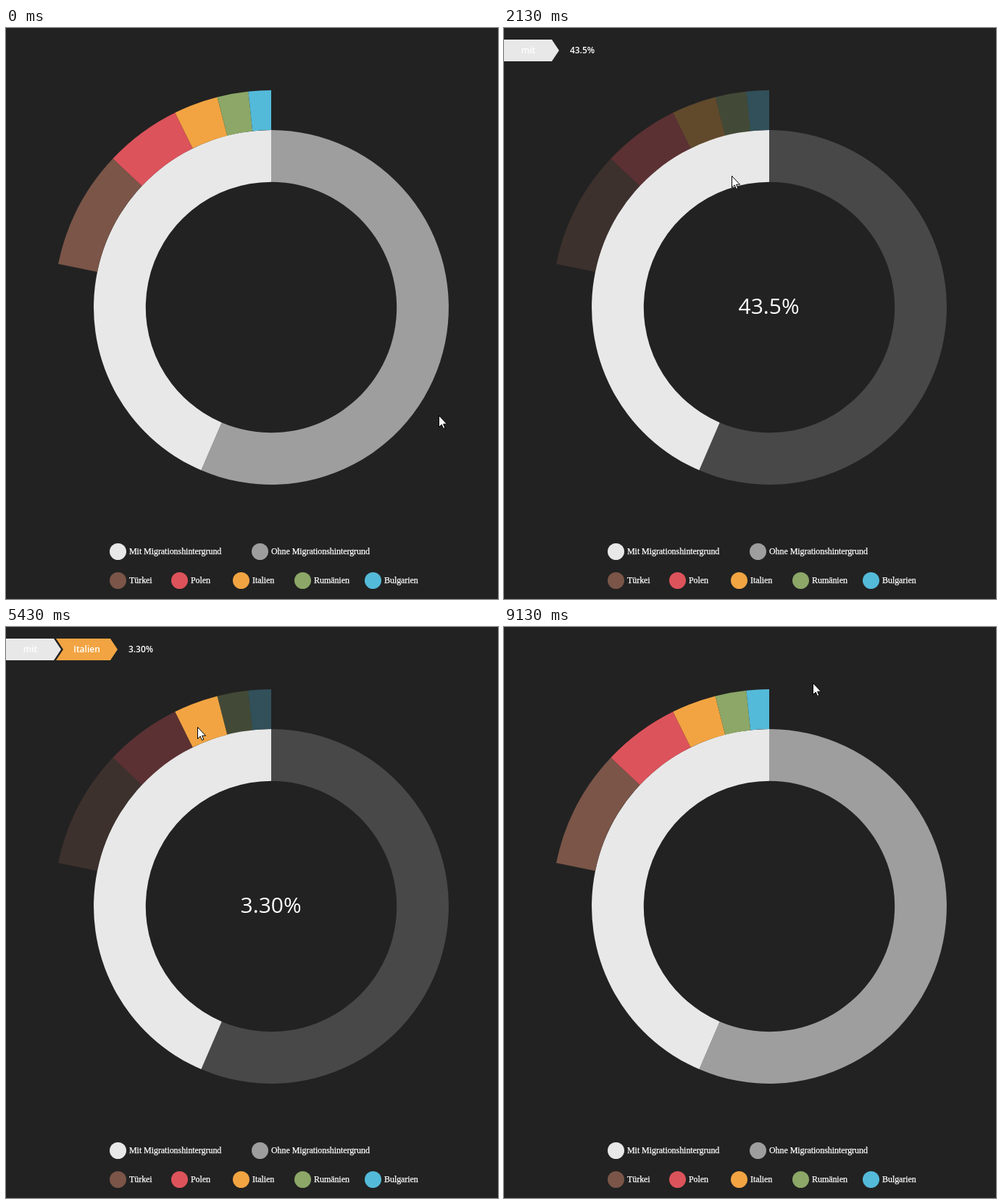
Animation, 679 px wide and 789 px high, one loop 9500 ms. Source, as an HTML page:

```html
<!DOCTYPE html>
<html lang="de">
<head>
<meta charset="utf-8">
<style>
  html, body { margin: 0; width: 100%; height: 100%; overflow: hidden; background: #222; }
  svg { display: block; }
  text { fill: #fff; }
  .sans { font-family: "Open Sans", sans-serif; text-anchor: middle; }
  .crumb { font-size: 12px; font-weight: 600; }
  .total { font-size: 30px; }
  .legend {
    font: 12px "Liberation Serif", "Times New Roman", serif;
    letter-spacing: -.06px; stroke: #fff; stroke-width: .25px;
  }
</style>
</head>
<body>
<svg id="stage" width="679" height="789" viewBox="0 0 679 789"></svg>
<script>
const LOOP = 9500, STEP = 75, CX = 366, CY = 386, R = 300;
const stage = document.getElementById('stage');

// Shares in percent
const inner = [['ohne', 56.45, '#9e9e9e'], ['mit', 43.55, '#e8e8e8']];
const outer = [
  ['Türkei', 8.81, '#7a5548'], ['Polen', 5.70, '#dc535b'], ['Italien', 3.30, '#f2a442'],
  ['Rumänien', 2.31, '#8ca767'], ['Bulgarien', 1.68, '#54bad9']
];

// Pointer moves: start, end, target x, y, slice hovered there
const home = { x: 597, y: 535, name: '' };
const moves = [
  [460, 740, 537, 503, 'ohne'],
  [1440, 1740, 367, 308, 'ohne'],
  [1970, 2210, 296, 169, 'mit'],
  [3220, 3760, 152, 232, 'Türkei'],
  [4210, 4460, 196, 164, 'Polen'],
  [4830, 5430, 264, 138, 'Italien'],
  [6050, 6520, 318, 118, 'Rumänien'],
  [6980, 7440, 342, 113, 'Bulgarien'],
  [8060, 8500, 397, 99, 'Bulgarien'],
  [8750, 8890, 426, 79, ''],
  [9050, 9130, 426, 77, '']
];

function add(tag, attrs, text = '') {
  const el = document.createElementNS('http://www.w3.org/2000/svg', tag);
  for (const name in attrs) el.setAttribute(name, attrs[name]);
  el.textContent = text;
  return stage.appendChild(el);
}

// Rings have equal areas.
function arc(from, share, ring) {
  const r0 = R * Math.sqrt(ring / 3), r1 = R * Math.sqrt((ring + 1) / 3);
  const at = (r, p) => {
    const a = p / 50 * Math.PI;
    return `${CX + r * Math.sin(a)} ${CY - r * Math.cos(a)}`;
  };
  const to = from + share, big = share > 50 ? 1 : 0;
  return `M${at(r1, from)}A${r1} ${r1} 0 ${big} 1 ${at(r1, to)}` +
         `L${at(r0, to)}A${r0} ${r0} 0 ${big} 0 ${at(r0, from)}Z`;
}

const slices = {};
function addRing(list, ring) {
  let from = 100 - list.reduce((sum, item) => sum + item[1], 0);
  for (const [name, share, color] of list) {
    const el = add('path', { d: arc(from, share, ring), fill: color });
    const label = (ring === 1 ? Math.round(share * 10 - .1) / 10 : share.toFixed(2)) + '%';
    slices[name] = { el, color, label, trail: ring === 1 ? [name] : ['mit', name] };
    from += share;
  }
}
addRing(inner, 1);
addRing(outer, 2);

function legend(x, y, name, text = name) {
  add('circle', { cx: x + 11.5, cy: y, r: 11.5, fill: slices[name].color });
  add('text', { x: x + 27, y: y + 3.5, class: 'legend' }, text);
}
legend(143, 723.5, 'mit', 'Mit Migrationshintergrund');
legend(339, 723.5, 'ohne', 'Ohne Migrationshintergrund');
[143, 228, 313, 398, 495].forEach((x, i) => legend(x, 763.5, outer[i][0]));

const crumbs = ['M0 16H66L76 31 66 46H0Z', 'M69 16H144L154 31 144 46H69L79 31Z'].map((d, i) => ({
  shape: add('path', { d }),
  text: add('text', { x: 33.5 + 78 * i, y: 35, class: 'sans crumb' })
}));
const share = add('text', { y: 35, class: 'sans crumb' });
const total = add('text', { x: CX - .4, y: 395, class: 'sans total' });
const pointer = add('path', {
  d: 'M.5 .5V16.5L4.2 13 6.5 18.4 8.8 17.4 6.6 12.2H11.5Z', fill: '#fff', stroke: '#000'
});

// The pointer jumps in even steps; the hovered slice follows late in each move.
function stateAt(t) {
  let { x, y, name } = home;
  for (const [a, b, tx, ty, next] of moves) {
    if (t < a) break;
    const n = Math.round((b - a) / STEP) + 1, gap = (b - a) / (n - 1);
    const k = Math.min(1, (Math.floor((t - a) / gap + 1e-6) + 1) / n);
    x += (tx - x) * k;
    y += (ty - y) * k;
    if (k >= .6) name = next;
  }
  return { x: Math.round(x), y: Math.round(y), name };
}

let shown = null;
function select(name) {
  if (name === shown) return;
  shown = name;
  const { trail, label } = slices[name] || { trail: [], label: '' };
  for (const key in slices) {
    slices[key].el.setAttribute('opacity', !name || trail.includes(key) ? 1 : .3);
  }
  crumbs.forEach((c, i) => {
    c.shape.setAttribute('fill', trail[i] ? slices[trail[i]].color : 'none');
    c.text.textContent = trail[i] || '';
  });
  share.setAttribute('x', 30 + 78 * trail.length);
  share.textContent = total.textContent = label;
}

function draw(now) {
  const { x, y, name } = stateAt(now % LOOP);
  select(name);
  pointer.setAttribute('transform', `translate(${x} ${y})`);
}

let begin;
function tick(now) {
  begin ??= now;
  draw(now - begin);
  requestAnimationFrame(tick);
}
draw(0);
requestAnimationFrame(tick);
</script>
</body>
</html>
```
